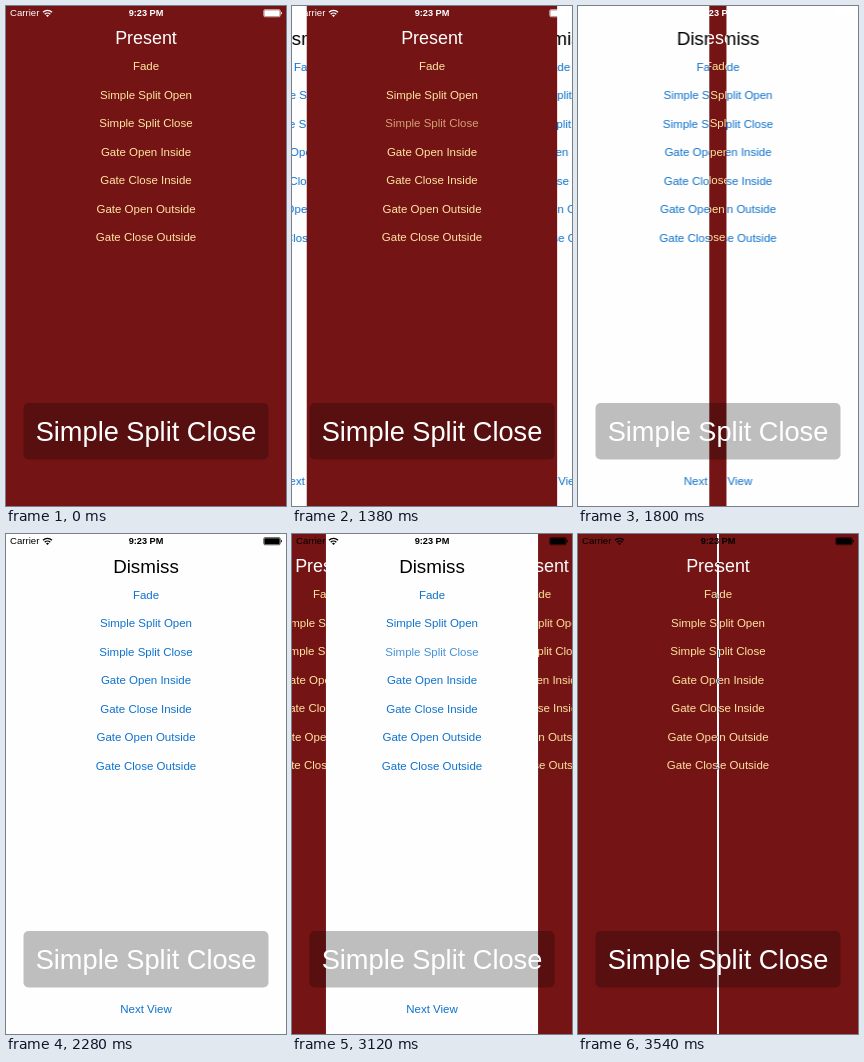
These frames come from a looping animation (280 by 500 pixels, 3600 ms). An HTML page:

```html
<!DOCTYPE html>
<html lang="en">
<head>
<meta charset="utf-8">
<title>Split transition</title>
<style>
  html, body { margin: 0; width: 100%; height: 100%; overflow: hidden; background: #751414; }
  #stage { display: block; width: 280px; height: 500px; }
  text { font-family: "Liberation Sans", Arial, sans-serif; text-anchor: middle; }
  .item { font-size: 11.5px; }
  .present { --paper: #751414; --title: #fff; --link: #ffe6a3; --press: press-present; }
  .dismiss { --paper: #fefefe; --title: #000; --link: #0f72cc; --press: press-dismiss; }
  .paper { fill: var(--paper); }
  .title { fill: var(--title); }
  .item { fill: var(--link); }
  .present .title { font-size: 17.9px; }
  .dismiss .title { font-size: 18.8px; }

  .base.dismiss { animation: swap 3.6s step-end infinite; }
  .base .pressed { animation: var(--press) 3.6s linear infinite; }
  .half { animation: 3.6s linear infinite; }
  .half.dismiss { animation-name: close-dismiss; }
  .half.present { animation-name: close-present; }
  .left { --away: -140px; }
  .right { --away: 140px; }
  #status { color: #fff; fill: currentColor; animation: status 3.6s step-end infinite; }
  #status text { font-size: 9.6px; }
  #status .clock { font-size: 9.2px; font-weight: 700; }
  .caption { font-size: 27.2px; fill: #fff; }

  @keyframes swap {
    0% { opacity: 0; }
    53.389%, 100% { opacity: 1; }
  }
  @keyframes status {
    0% { color: #fff; }
    53.389% { color: #000; }
    99.528%, 100% { color: #fff; }
  }
  @keyframes close-dismiss {
    0% { transform: translateX(var(--away)); }
    33.944% { transform: translateX(var(--away)); animation-timing-function: ease-in-out; }
    53.389% { transform: translateX(0); animation-timing-function: step-start; }
    53.4%, 100% { transform: translateX(var(--away)); }
  }
  @keyframes close-present {
    0% { transform: translateX(var(--away)); }
    80.056% { transform: translateX(var(--away)); animation-timing-function: ease-in-out; }
    99.528%, 100% { transform: translateX(0); }
  }
  @keyframes press-present {
    0%, 26% { opacity: 1; }
    26.01%, 34% { opacity: .27; }
    42%, 100% { opacity: 1; }
  }
  @keyframes press-dismiss {
    0%, 71.6% { opacity: 1; }
    71.61%, 81.7% { opacity: .27; }
    89%, 100% { opacity: 1; }
  }
</style>
</head>
<body>
<svg id="stage" viewBox="0 0 280 500">
  <g id="pages"></g>
  <g id="status">
    <text x="18.7" y="10.4">Carrier</text>
    <g fill="none" stroke="currentColor" stroke-width="1.3">
      <path d="M37 6.3a6.4 6.4 0 0 1 9 0M38.7 8.2a4 4 0 0 1 5.6 0"/>
    </g>
    <path d="M40 9.4a2.2 2.2 0 0 1 3 0L41.5 11z"/>
    <text class="clock" x="140" y="10.4">9:23 PM</text>
    <rect x="258.3" y="4.2" width="15.4" height="6" rx=".8"/>
    <rect x="257.7" y="3.6" width="16.6" height="7.2" rx="1.4" fill="none" stroke="currentColor" stroke-width=".6"/>
    <path d="M275 5.8a1.5 1.5 0 0 1 0 2.8z"/>
  </g>
  <rect x="17.5" y="397" width="245" height="56.5" rx="5" fill="#000" fill-opacity=".25"/>
  <text class="caption" x="140" y="435.3">Simple Split Close</text>
</svg>
<script>
  const items = ["Fade", "Simple Split Open", "Simple Split Close", "Gate Open Inside",
    "Gate Close Inside", "Gate Open Outside", "Gate Close Outside"];

  const label = (cls, y, words) => `<text class="${cls}" x="140" y="${y}">${words}</text>`;

  const page = (title, top, footer = "") =>
    `<rect class="paper" width="280" height="500"/>` +
    label("title", top - 25.8, title) +
    items.map((words, i) => label(i === 2 ? "item pressed" : "item", top + 28.5 * i, words)).join("") +
    footer;

  const content = {
    present: page("Present", 64.1),
    dismiss: page("Dismiss", 64.9, label("item", 478.5, "Next View")),
  };

  const base = kind => `<g class="base ${kind}">${content[kind]}</g>`;

  const half = (kind, side, x) =>
    `<g class="half ${kind} ${side}"><svg x="${x}" width="140" height="500" ` +
    `viewBox="${x} 0 140 500">${content[kind]}</svg></g>`;

  const halves = kind => half(kind, "left", 0) + half(kind, "right", 140);

  document.getElementById("pages").innerHTML =
    base("present") + base("dismiss") + halves("dismiss") + halves("present");
</script>
</body>
</html>
```
